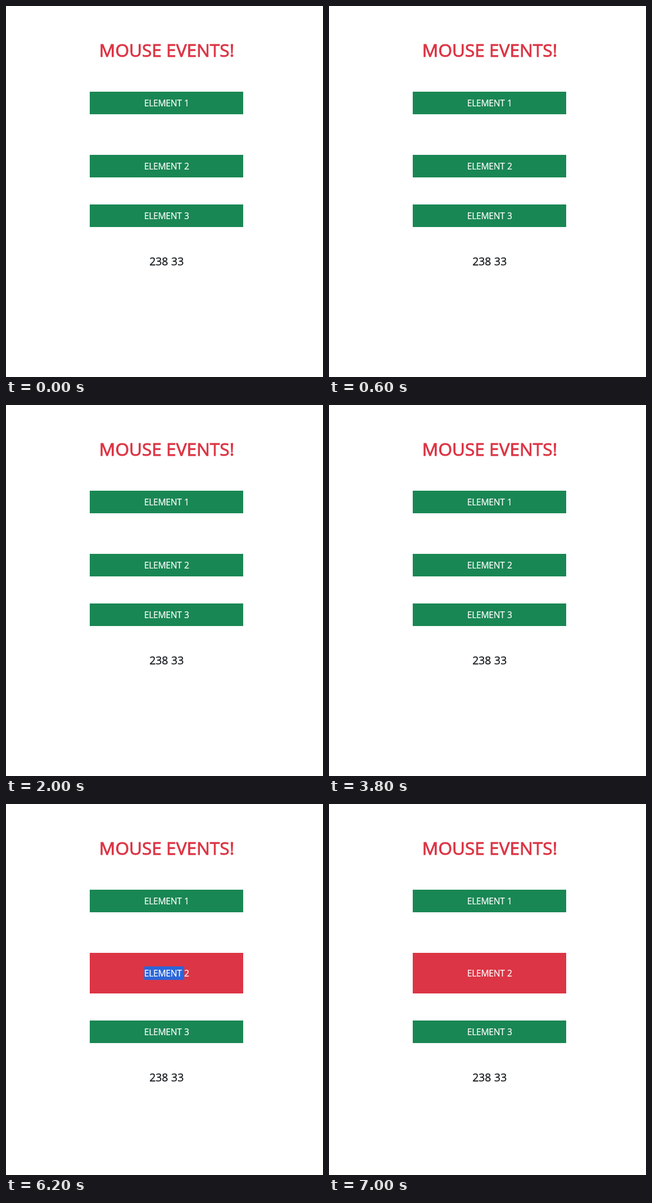
Recreate the animation shown at these times as an HTML page. Size 564 by 658 pixels, loop 8000 ms.

```html
<!DOCTYPE html>
<html lang="en">
<head>
<meta charset="utf-8">
<title>Mouse events</title>
<style>
  html, body { margin: 0; width: 100%; height: 100%; overflow: hidden; background: #fff; }
  svg { display: block; width: 564px; height: 658px; }
  text { font-family: "Open Sans", "Noto Sans", sans-serif; text-anchor: middle; fill: #212529; }
  .heading { stroke: #212529; }
  .title { font-size: 31.6px; fill: #dc3545; stroke: #dc3545; stroke-width: .9px; }
  .hello { font-size: 38.5px; stroke-width: 1.2px; }
  .counter { font-size: 19.4px; word-spacing: .6px; stroke-width: .45px; }
  .label { font-size: 15.7px; letter-spacing: -.3px; word-spacing: .5px; fill: #fff; stroke: #fff; stroke-width: .2px; }
  .bar { fill: #198754; }
  .hover .bar { fill: #dc3545; }
  .selection { fill: #2b66d9; }
</style>
</head>
<body>
<svg viewBox="0 0 564 658">
  <text class="heading title" x="286" y="90">MOUSE EVENTS!</text>
  <g>
    <rect class="bar" x="149" y="152" width="273" height="40"/>
    <text class="label" x="285.7" y="178">ELEMENT 1</text>
  </g>
  <text id="hello" class="heading hello" x="286" y="281">Hello Kesot</text>
  <g id="second">
    <rect id="secondBar" class="bar" x="149" y="264" width="273" height="40"/>
    <rect id="selection" class="selection" x="246" y="288" width="71" height="24"/>
    <text id="secondLabel" class="label" x="285.7" y="290">ELEMENT 2</text>
  </g>
  <g id="below">
    <rect class="bar" x="149" y="352" width="273" height="40"/>
    <text class="label" x="285.7" y="378">ELEMENT 3</text>
    <text class="heading counter" x="285.7" y="460">238 33</text>
  </g>
</svg>
<script>
  const LOOP = 8000;
  const HELLO_HEIGHT = 56;
  const HOVER_PADDING = 16;
  const steps = [
    { at: 0 },
    { at: 1000, hello: true },
    { at: 2000 },
    { at: 5000, hover: true, selected: true },
    { at: 7000, hover: true }
  ];

  const byId = id => document.getElementById(id);
  const show = (id, on) => byId(id).setAttribute("visibility", on ? "visible" : "hidden");
  const shift = (id, y) => byId(id).setAttribute("transform", `translate(0 ${y})`);

  function render({ hello, hover, selected }) {
    const push = hello ? HELLO_HEIGHT : 0;
    const padding = hover ? HOVER_PADDING : 0;
    show("hello", hello);
    show("selection", selected);
    byId("second").classList.toggle("hover", Boolean(hover));
    byId("secondBar").setAttribute("height", 40 + 2 * padding);
    shift("secondLabel", padding);
    shift("second", push);
    shift("below", push + 2 * padding);
  }

  const start = performance.now();
  let current;

  function tick() {
    const time = (performance.now() - start) % LOOP;
    const step = steps.findLast(s => s.at <= time);
    if (step !== current) render(current = step);
    requestAnimationFrame(tick);
  }
  tick();
</script>
</body>
</html>
```
